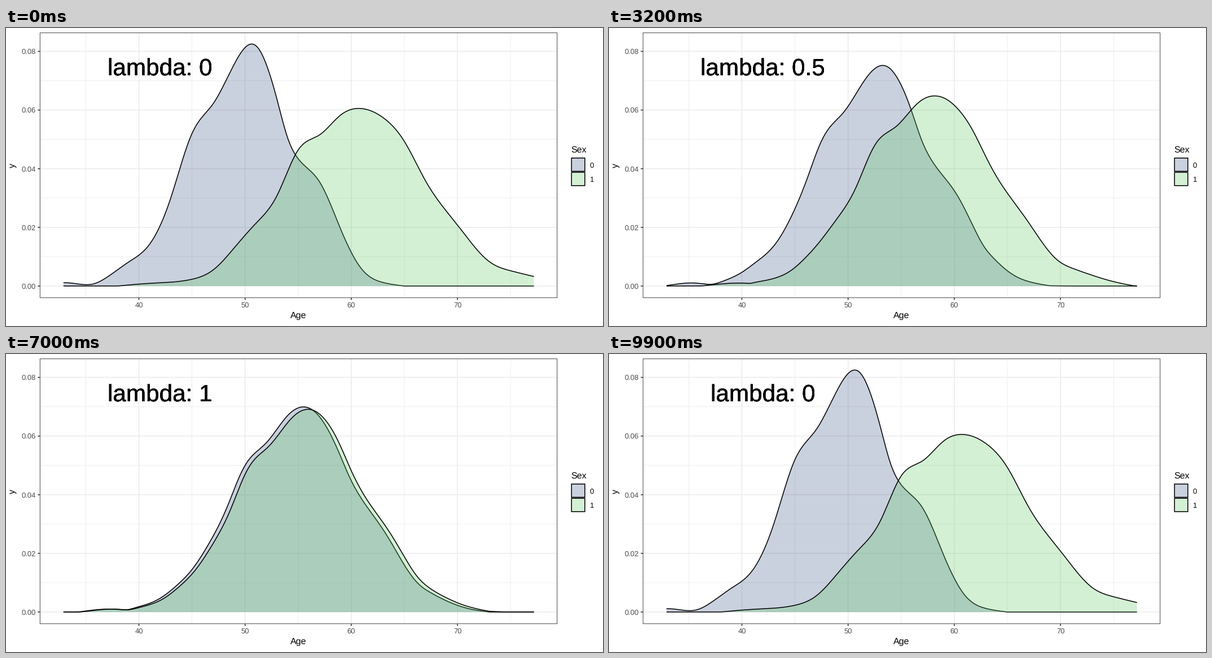
A matplotlib script for the animation above (10000 ms loop, 1058 px wide and 529 px high).

```python
import numpy as np
import matplotlib.pyplot as plt
from matplotlib.animation import FuncAnimation
from matplotlib.patches import Rectangle

plt.rcParams["font.family"] = "Liberation Sans"
plt.rcParams["path.snap"] = False
plt.rcParams["text.hinting"] = "none"

W, H, DPI = 1058, 529, 100
LEFT, RIGHT, TOP, BOTTOM = 60.3, 976.7, 8.6, 478.8
BLUE, GREEN, ALPHA = "#3A5285", "#5DC863", 0.27
PX = 72 / DPI
LINE = 1.55 * PX

LAMBDAS = [0, 0.5, 0.8, 1, 0]
KEY_FRAMES = [5, 25, 31, 50, 55, 74, 80, 99]
KEY_PHASES = [0, 1, 1, 2, 2, 3, 3, 4]

# Key points (age, density * 1e4) of the two unrepaired groups.
SEX_0 = [(31, 1), (33.3, 11), (35.8, 8), (37, 30), (39, 81), (41, 142),
         (43, 300), (45, 520), (47, 622), (49, 758), (51, 820), (53, 637),
         (54, 506), (55, 434), (57, 356), (59, 194), (61, 57), (63, 12),
         (65, 0)]
SEX_1 = [(38, 0), (41, 9), (43, 13), (45, 23), (47, 55), (49, 131), (51, 213),
         (53, 308), (55, 464), (57, 515), (59, 583), (61, 605), (63, 574),
         (65, 493), (67, 358), (70, 208), (73, 83), (75, 52), (77, 34),
         (81, 0)]


def px_x(age):
    return 235.5 + 18.82 * (np.asarray(age) - 40)


def px_y(density):
    return 458 - 5206 * np.asarray(density)


def smooth_density(x, points):
    """Natural cubic spline through the key points, zero outside them."""
    kx, ky = np.array(points, float).T
    h, n = np.diff(kx), len(kx)
    slope = np.diff(ky) / h
    system, rhs = np.eye(n), np.zeros(n)
    for i in range(1, n - 1):
        system[i, i - 1:i + 2] = h[i - 1], 2 * (h[i - 1] + h[i]), h[i]
        rhs[i] = 6 * (slope[i] - slope[i - 1])
    bend = np.linalg.solve(system, rhs)
    i = np.clip(np.searchsorted(kx, x) - 1, 0, n - 2)
    b = (x - kx[i]) / h[i]
    a = 1 - b
    curve = (a * ky[i] + b * ky[i + 1] + h[i]**2 / 6
             * ((a**3 - a) * bend[i] + (b**3 - b) * bend[i + 1]))
    inside = (x >= kx[0]) & (x <= kx[-1])
    return np.where(inside, np.maximum(curve, 0), 0) * 1e-4 + 1e-8


def cumulative(pdf):
    total = np.cumsum(pdf)
    return total / total[-1]


grid = np.linspace(30, 82, 4001)
pdfs = [smooth_density(grid, points) for points in (SEX_0, SEX_1)]
cdfs = [cumulative(pdf) for pdf in pdfs]
ranks = np.sort(np.concatenate(cdfs))
quantiles = [np.interp(ranks, cdf, grid) for cdf in cdfs]
heights = [np.interp(q, grid, pdf) for q, pdf in zip(quantiles, pdfs)]
ages = np.linspace(32.9, 77.2, 512)
xs = px_x(ages)


def repaired(group, lam):
    """Density after moving each quantile towards the mean of both groups."""
    own, other = 1 - lam / 2, lam / 2
    x = own * quantiles[group] + other * quantiles[1 - group]
    y = 1 / (own / heights[group] + other / heights[1 - group])
    return np.interp(ages, x, y, left=0, right=0)


fig = plt.figure(figsize=(W / DPI, H / DPI), dpi=DPI, facecolor="white")
ax = fig.add_axes([0, 0, 1, 1])
ax.set(xlim=(0, W), ylim=(H, 0))
ax.axis("off")


def segment(x, y, color, width, z):
    ax.plot(x, y, color=color, lw=width * PX, zorder=z, solid_capstyle="butt")


def label(x, y, text, size, color="black", ha="center", **kw):
    return ax.text(x, y, text, fontsize=size * PX, color=color, ha=ha,
                   va="baseline", zorder=9, **kw)


def grid_x(age, width):
    segment([px_x(age)] * 2, [TOP, BOTTOM], "#EBEBEB", width, 1)


def grid_y(density, width):
    segment([LEFT, RIGHT], [px_y(density)] * 2, "#EBEBEB", width, 1)


for age in range(35, 80, 10):
    grid_x(age, 0.8)
for step in range(4):
    grid_y(0.01 + 0.02 * step, 0.8)
for age in range(40, 80, 10):
    grid_x(age, 1.55)
    segment([px_x(age)] * 2, [BOTTOM, BOTTOM + 4], "#333333", 1.55, 8)
    label(px_x(age), 496.2, str(age), 13, "#4D4D4D")
for step in range(5):
    density = 0.02 * step
    grid_y(density, 1.55)
    segment([LEFT - 4, LEFT], [px_y(density)] * 2, "#333333", 1.55, 8)
    label(52.8, px_y(density) + 4.7, f"{density:.2f}", 13, "#4D4D4D", "right")

ax.add_patch(Rectangle((LEFT, TOP), RIGHT - LEFT, BOTTOM - TOP, fill=False,
                       ec="#333333", lw=0.9 * PX, zorder=8))
label(518, 515, "Age", 16)
label(15.7, 244, "y", 16, rotation=90, rotation_mode="anchor")

label(1001.5, 220.5, "Sex", 16, ha="left")
for top, color, name in ((230.8, BLUE, "0"), (256.2, GREEN, "1")):
    box = (1002.2, top), 23.6, 23.6
    ax.add_patch(Rectangle(*box, fc=color, alpha=ALPHA, lw=0))
    ax.add_patch(Rectangle(*box, fill=False, ec="black", lw=LINE))
    label(1034.5, top + 16.7, name, 13, ha="left")

groups = []
for group, color in enumerate((BLUE, GREEN)):
    curves = [repaired(group, lam) for lam in LAMBDAS]
    fill, = ax.fill([], [], color=color, alpha=ALPHA, lw=0,
                    zorder=3 + 2 * group)
    line, = ax.plot([], [], color="black", lw=LINE, zorder=4 + 2 * group,
                    solid_capstyle="butt")
    groups.append((curves, fill, line))

# Stacked copies harden the edges of the large caption.
captions = [label(272.5, 83.7, "", 42.2) for _ in range(4)]


def draw(frame):
    phase = np.interp(frame, KEY_FRAMES, KEY_PHASES)
    state = min(int(phase), len(LAMBDAS) - 2)
    mix = phase - state
    for curves, fill, line in groups:
        ys = px_y((1 - mix) * curves[state] + mix * curves[state + 1])
        line.set_data(xs, ys)
        base = [[xs[-1], px_y(0)], [xs[0], px_y(0)]]
        fill.set_xy(np.vstack([np.column_stack([xs, ys]), base]))
    for caption in captions:
        caption.set_text(f"lambda: {LAMBDAS[int(phase + 0.5)]}")
    return []


anim = FuncAnimation(fig, draw, frames=100, interval=100, repeat=True,
                     repeat_delay=0, blit=False)
plt.show()
```
